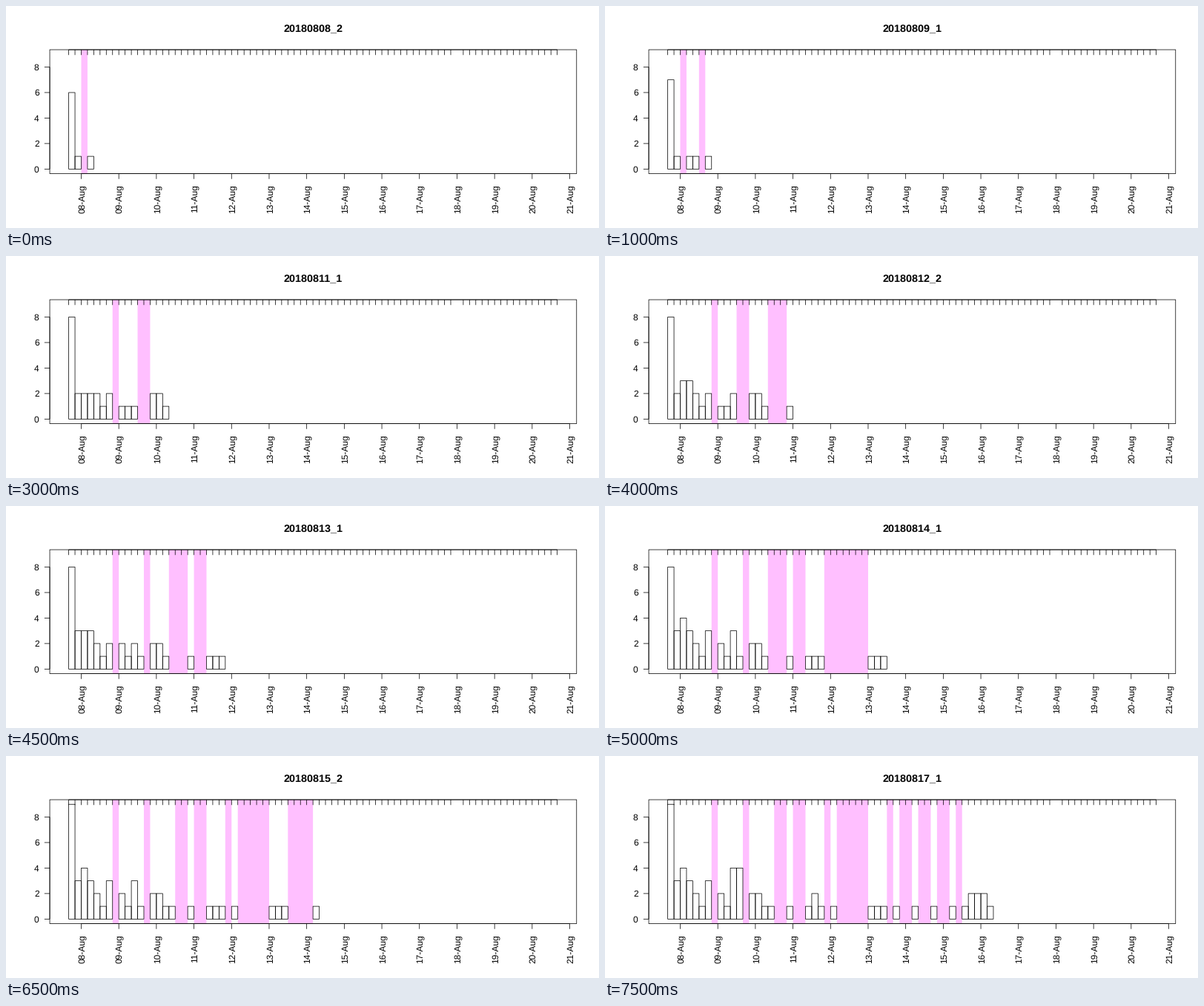
Animation of 800x300 px, one loop 8 s. Source, as a matplotlib script:

```python
from math import ceil

import matplotlib.pyplot as plt
import numpy as np
from matplotlib.animation import FuncAnimation
from matplotlib.collections import LineCollection, PolyCollection

W, H, DPI = 800, 300, 100
PX = 72 / DPI                       # points per pixel
LINE = 0.75 * PX
LEFT, RIGHT, TOP, BOTTOM = 59.04, 769.76, 59.04, 226.56
BIN0, BIN = 84.6, 8.449             # first four-hour bin and its width
UNIT = (BOTTOM - TOP) / 9.72
TICK = 7.2

# The first day starts at its second run; some days have only one run
RUNS = [(8, 2), (8, 3)] + [(day, run) for day in range(9, 18) for run in (1, 2)
                           if run == 1 or day in (9, 10, 12, 14, 15)]
REACH = [3, 3, 6, 6, 6, 10, 15, 19, 19, 24, 34, 34, 34, 39, 42, 51]  # newest bin

# Bins above one: final count, step when it is reached, steps per unit of growth
PEAKS = {0: (9, 11, 5), 1: (3, 9, 5), 2: (4, 10, 2), 3: (3, 8, 2), 4: (2, 5, 1),
         6: (3, 10, 4), 8: (2, 9, 1), 10: (4, 13.6, 3.6), 11: (4, 15, 0.5),
         23: (2, 15, 1)}
PEAKS.update(dict.fromkeys((13, 14, 48, 49, 50), (2, 0, 1)))
LATE = (2, 5, 11, 16, 26, 36)       # bins that stay empty for a while


def is_empty(k, step):
    if k in LATE:
        return step < np.interp(k, [2, 16, 36], [4.2, 10.6, 13.6])
    return (k in (7, 12, 25) or 27 <= k < 32
            or 17 <= k < 22 and k % 3 != 1
            or 35 <= k < 47 and k % 3 != 0)


def count(k, step):
    if is_empty(k, step):
        return 0
    top, ripe, pace = PEAKS.get(k, (1, 0, 1))
    return max(1, top - ceil(max(0, ripe - step) / pace))


def x_of(k):
    return BIN0 + BIN * k


def y_of(v):
    return BOTTOM - (v + 0.36) * UNIT


def box(x0, y0, x1, y1):
    return [(x0, y0), (x1, y0), (x1, y1), (x0, y1)]


def zero_runs(counts):
    start = None
    for k, v in enumerate(counts):
        if v == 0 and start is None:
            start = k
        elif v and start is not None:
            yield start, k
            start = None


plt.rcParams.update({"font.family": "Liberation Sans", "text.hinting": "none"})
fig = plt.figure(figsize=(W / DPI, H / DPI), dpi=DPI, facecolor="white")
ax = fig.add_axes([0, 0, 1, 1])
ax.set_xlim(0, W)
ax.set_ylim(H, 0)
ax.axis("off")

outline = dict(facecolors="none", edgecolors="black", linewidths=LINE, snap=False)
gaps = PolyCollection([], facecolors="#ffbfff", edgecolors="none", snap=False, zorder=1)
bars = PolyCollection([], zorder=2, **outline)
frame = PolyCollection([box(LEFT, TOP, RIGHT, BOTTOM)], zorder=3, **outline)

days = [x_of(2 + 6 * d) for d in range(14)]
levels = range(0, 10, 2)
rug = [x_of(k) for k in range(79) if k != 62]
lines = [[(x, BOTTOM), (x, BOTTOM + TICK)] for x in days]
lines += [[(LEFT - TICK, y_of(v)), (LEFT, y_of(v))] for v in levels]
lines += [[(x, TOP), (x, TOP + TICK)] for x in rug]
lines += [[(days[0], BOTTOM), (days[-1], BOTTOM)],
          [(LEFT, y_of(0)), (LEFT, y_of(8))],
          [(rug[0], TOP), (rug[-1], TOP)]]
axes = LineCollection(lines, colors="black", linewidths=LINE, snap=False, zorder=3)
for coll in (gaps, bars, frame, axes):
    ax.add_collection(coll, autolim=False)

label = dict(fontsize=12 * PX, ha="right", va="baseline", rotation_mode="anchor")
for d, x in enumerate(days):
    ax.text(x + 4.3, BOTTOM + 2 * TICK, f"{d + 8:02d}-Aug", rotation=90, **label)
for v in levels:
    ax.text(LEFT - 2 * TICK, y_of(v) + 4.3, str(v), **label)
title = ax.text((LEFT + RIGHT) / 2, 35, "", fontsize=14.4 * PX,
                weight="bold", ha="center", va="baseline")


def draw(step):
    day, run = RUNS[step]
    counts = [count(k, step) for k in range(REACH[step] + 1)]
    title.set_text(f"201808{day:02d}_{run}")
    bars.set_verts([box(x_of(k), y_of(v), x_of(k + 1), y_of(0))
                    for k, v in enumerate(counts) if v])
    gaps.set_verts([box(x_of(a), TOP, x_of(b), BOTTOM) for a, b in zero_runs(counts)])
    return gaps, bars, title


anim = FuncAnimation(fig, draw, frames=len(RUNS), interval=500,
                     repeat=True, repeat_delay=0, blit=False)
plt.show()
```
